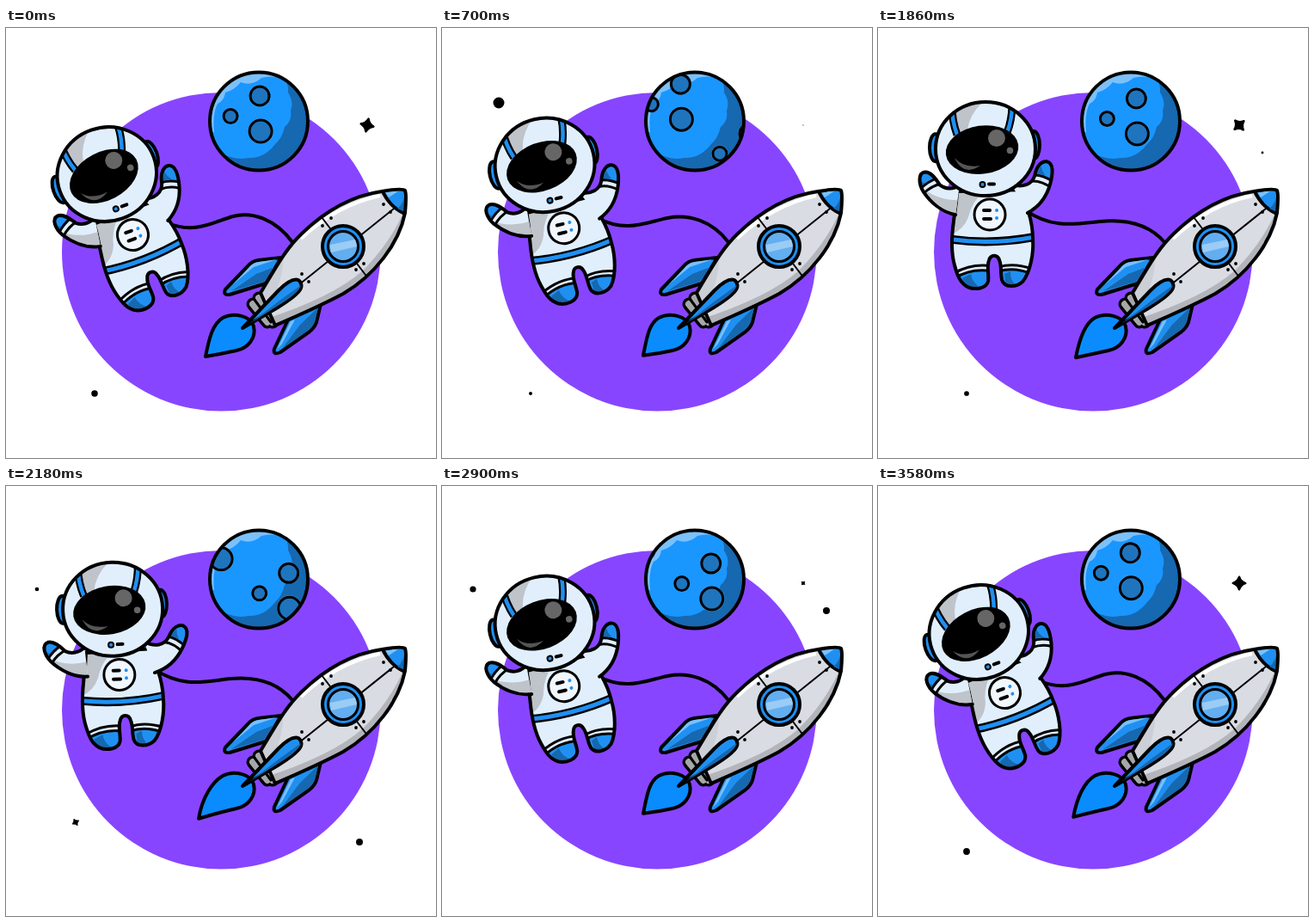
These frames come from a looping animation (500x500 px, 3600 ms). An HTML page:

```html
<!DOCTYPE html>
<html lang="en">
<head>
<meta charset="utf-8">
<title>Astronaut and rocket</title>
<style>
  html, body { margin: 0; width: 100%; height: 100%; overflow: hidden; background: #fff; }
  svg { display: block; width: 100%; height: 100%; }
  .ink { stroke: #000; stroke-width: 4; stroke-linejoin: round; stroke-linecap: round; }
  .thin { stroke-width: 3; }
  .hair { stroke-width: 2; }
  .line { fill: none; }
  .suit { fill: #e1effd; }
  .blue { fill: #1f90f2; }
  .deep { fill: #1668b0; }
  .grey { fill: #bfc3ca; }
  .pale { fill: #7cc0fa; }
</style>
</head>
<body>
<svg viewBox="0 0 500 500">
  <defs>
    <clipPath id="moonClip"><circle cx="294" cy="108.500" r="57"/></clipPath>
    <clipPath id="helmetClip"><ellipse cx="125" cy="140.500" rx="57" ry="54"/></clipPath>
    <path id="torso" d="M92 190C91 208 89 214 88 224C85 245 85 262 89 276C92 287 95 296 104 301C113 305 126 303 128 294C129 286 126 277 129 270C131 263 139 263 141 270C144 277 142 285 144 293C147 302 160 302 168 295C177 284 181 262 180 246C180 232 178 224 175 214L172 188Z"/>
    <clipPath id="torsoClip"><use href="#torso"/></clipPath>
    <path id="hull" d="M437 190Q461 186 464 189Q466 194 464 215C457 251 428 288 392 309C366 323 340 334 313 346L296 308C312 282 324 258 344 239C372 212 402 195 437 190Z"/>
    <clipPath id="hullClip"><use href="#hull"/></clipPath>
    <path id="armL" d="M95 183C87 188 78 187 72 182C67 174 62 167 55 167C47 168 47 180 53 190C61 202 74 214 90 217"/>
    <clipPath id="armLClip"><use href="#armL"/></clipPath>
    <path id="armR" d="M155 182C168 186 179 182 182 171C184 160 190 154 196 155C204 157 203 169 200 181C196 196 187 208 174 215"/>
    <clipPath id="armRClip"><use href="#armR"/></clipPath>
  </defs>

  <circle cx="250.300" cy="260.300" r="185.300" fill="#8845ff"/>
  <g id="sparks"></g>

  <g clip-path="url(#moonClip)">
    <circle cx="294" cy="108.500" r="57" fill="#1a96ff"/>
    <path class="pale" d="M230 110L240 60L290 45L345 70Q318 52 297 58Q286 68 273 63Q266 72 255 75Q254 84 246 88Q240 98 242 122Z"/>
    <path class="deep" d="M322 52Q329 66 328 75Q335 86 331 96Q333 108 324 115Q321 128 313 135Q300 152 282 151Q262 155 246 142L270 172H360V60Z"/>
    <g id="craters"></g>
  </g>
  <circle class="ink line" cx="294" cy="108.500" r="57"/>

  <path id="rope" class="ink line"/>

  <g id="rocket">
    <path id="flame" class="ink" fill="#0a8cff"/>
    <path class="ink blue" d="M320 267L293 270Q286 271 281 277L255 304Q252 311 260 310L302 297Z"/>
    <path class="deep" d="M262 306L291 286L312 278L300 295Z"/>
    <path class="pale" d="M315 269L294 272Q287 273 283 278L264 298L288 278Z"/>
    <path class="ink blue" d="M366 321L361 342Q359 348 353 353L319 377Q310 381 312 373L329 337Z"/>
    <path class="deep" d="M363 325L359 341Q357 347 351 352L321 373L342 345Z"/>
    <path class="pale" d="M315 374L331 341L336 339L321 367Z"/>
    <path class="line" d="M287 321L304 342M294 314L310 342" stroke="#000" stroke-width="15" stroke-linecap="round"/>
    <path class="line" d="M287 321L304 342M294 314L310 342" stroke="#a5a7a8" stroke-width="8" stroke-linecap="round"/>
    <path class="ink line thin" d="M289 316L308 342"/>
    <use href="#hull" fill="#d9dce3"/>
    <g clip-path="url(#hullClip)">
      <path fill="#b3b5bb" d="M470 195Q453 244 415 282Q380 313 300 339V360H430L480 260Z"/>
      <path class="grey" d="M290 310L322 262Q324 285 310 318Z" opacity=".5"/>
      <path class="line" stroke="#fff" stroke-width="4" d="M343 245Q384 206 435 195"/>
      <path class="ink line hair" d="M364 216L421 291M330 307L456 206"/>
      <path class="ink blue" d="M437 188Q446 209 466 217L475 180Z"/>
      <path class="deep" d="M464 190Q463 204 455 210L466 215Z"/>
      <path class="pale" d="M441 191L459 188L445 197Z"/>
    </g>
    <use href="#hull" class="ink line"/>
    <g id="rivets"></g>
    <circle class="ink blue" cx="392" cy="254" r="24"/>
    <circle class="ink thin" cx="392" cy="254" r="17.500" fill="#63aef0"/>
    <path fill="#9accf5" d="M377 252L406 246L408 254L378 261Z"/>
    <path class="ink blue" d="M275 349L317 305Q332 290 340 293Q347 299 340 307Q334 314 316 325Z"/>
    <path class="deep" d="M283 344L318 317L343 299Q341 308 316 323Z"/>
  </g>

  <g id="astronaut">
    <use href="#torso" class="suit"/>
    <g clip-path="url(#torsoClip)">
      <path class="grey" d="M80 188H124Q108 204 105 220Q99 236 82 241Z"/>
      <path class="line" stroke="#000" stroke-width="10" d="M80 245Q133 253 187 242"/>
      <path class="line" stroke="#1f90f2" stroke-width="5" d="M80 245Q133 253 187 242"/>
      <path class="ink blue thin" d="M88 291Q110 278 133 283V310H88ZM140 283Q158 277 182 287V310H140Z"/>
      <path class="ink line thin" d="M88 285Q110 273 133 277M140 278Q158 272 182 281"/>
      <path class="deep" d="M98 291L108 286Q109 296 120 303H100ZM147 286L154 283Q153 293 161 300H148Z"/>
    </g>
    <use href="#torso" class="ink line"/>
    <g id="leftArm">
      <use href="#armL" class="suit"/>
      <g clip-path="url(#armLClip)">
        <path class="grey" d="M50 184Q70 202 100 200V222H70Z"/>
        <path class="ink blue thin" d="M50 186Q58 178 70 174L60 160L40 165Z"/>
        <path class="ink line thin" d="M53 192Q62 183 76 180"/>
        <path class="deep" d="M50 172Q50 180 55 180L50 184Z"/>
      </g>
      <use href="#armL" class="ink line"/>
    </g>
    <g id="rightArm">
      <use href="#armR" class="suit"/>
      <g clip-path="url(#armRClip)">
        <path class="ink blue thin" d="M180 171Q191 170 204 179L210 150H180Z"/>
        <path class="ink line thin" d="M178 178Q190 177 202 186"/>
        <path class="deep" d="M184 169L189 160Q190 166 194 171Z"/>
      </g>
      <use href="#armR" class="ink line"/>
    </g>
    <circle class="ink thin" cx="130" cy="217" r="18" fill="#f1f7fe"/>
    <path class="ink line" d="M123 212H130M123 222H131"/>
    <path class="blue" d="M136 212a2 2 0 1 0 4 0a2 2 0 1 0-4 0M136 221a2 2 0 1 0 4 0a2 2 0 1 0-4 0"/>

    <ellipse class="ink blue" cx="67" cy="139" rx="7" ry="16"/>
    <ellipse class="ink blue" cx="181" cy="136" rx="7" ry="16"/>
    <ellipse class="suit" cx="125" cy="140.500" rx="58" ry="54.500"/>
    <g clip-path="url(#helmetClip)">
      <path class="grey" d="M87 84L92 124L104 119Q106 100 124 84Z"/>
      <path class="line" stroke="#000" stroke-width="9" d="M86 90Q86 108 92 124M156 90Q156 106 150 122"/>
      <path class="line" stroke="#1f90f2" stroke-width="4.500" d="M86 90Q86 108 92 124M156 90Q156 106 150 122"/>
    </g>
    <ellipse class="ink line" cx="125" cy="140.500" rx="58" ry="54.500"/>
    <ellipse cx="121" cy="141.500" rx="42.500" ry="28" transform="rotate(-8 121 141)"/>
    <circle cx="138" cy="128" r="10" fill="#666"/>
    <circle cx="153.500" cy="142.500" r="3.800" fill="#666"/>
    <path fill="#555" d="M89 151Q99 163 119 160Q99 173 89 151Z"/>
    <circle class="ink blue hair" cx="121.500" cy="182" r="3"/>
    <path class="ink line" d="M129 181.500H135"/>
  </g>
</svg>
<script>
const LOOP = 3600, BEAT = 900;
const $ = id => document.getElementById(id);
const mix = (a, b, k) => a + (b - a) * k;

function add(parent, tag, attrs) {
  const node = document.createElementNS("http://www.w3.org/2000/svg", tag);
  for (const name in attrs) node.setAttribute(name, attrs[name]);
  return $(parent).appendChild(node);
}

const starShape = {
  d: "M0-1Q.2-.3 1 0Q.3.2 0 1Q-.2.3-1 0Q-.3-.2 0-1Z",
  stroke: "#000", "stroke-width": .35, "stroke-linejoin": "round"
};

// x, y, radius, time of largest size, half duration, four-pointed
const sparks = [
  [420, 113, 7.5, 20, 230, true], [81, 391, 4, 410, 180, true],
  [447, 145, 4, 200, 180], [66, 87, 6.5, 690, 180], [36, 120, 4, 260, 200],
  [103, 425, 4, 850, 225], [411, 414, 4, 390, 180]
].map(([x, y, size, peak, span, star]) => ({
  x, y, size, peak, span, star,
  node: star ? add("sparks", "path", starShape) : add("sparks", "circle", { r: 1 })
}));

// Two sets of craters, one step apart, scroll across the moon
const step = { x: 79.6, y: 57.5 };
for (const [x, y, r] of [[295, 79, 11], [261, 102.5, 8], [296, 120, 13]])
  for (const k of [-1, 0]) {
    const cx = x + k * step.x, cy = y + k * step.y;
    add("craters", "circle", { cx, cy, r: r + 2, fill: "#55b0fc", opacity: .5 });
    add("craters", "circle", { cx, cy, r, fill: "#1f74be", class: "ink thin" });
  }

for (const [x, y] of [[368, 230], [378, 221], [439, 205], [447, 214], [407, 281], [416, 274], [344, 286], [352, 295]])
  add("rivets", "circle", { cx: x, cy: y, r: 1.9 });

// Reach of the flame tip over half a beat
const flicker = [[0, 232], [60, 230], [200, 234], [250, 234], [380, 224], [430, 227], [450, 232]];
function flameTip(t) {
  const i = flicker.findIndex(([end]) => end > t);
  const [t0, x0] = flicker[i - 1], [t1, x1] = flicker[i];
  return mix(x0, x1, (t - t0) / (t1 - t0));
}

function draw(t) {
  const beat = t % BEAT, turn = beat / BEAT;
  const lift = (1 - Math.cos(2 * Math.PI * t / LOOP)) / 2;
  const wave = Math.sin(Math.PI * turn) ** 2;
  const set = (id, value) => $(id).setAttribute("transform", value);

  set("astronaut", `translate(${mix(147.5, 130, lift)} ${mix(240.5, 217, lift)}) rotate(${-19.5 * (1 - lift)}) translate(-130 -217)`);
  set("leftArm", `rotate(${-13 * wave} 95 203)`);
  set("rightArm", `rotate(${14 * wave} 168 203)`);
  set("craters", `translate(${step.x * turn} ${step.y * turn ** 1.1})`);

  const at = (a, b) => mix(a, b, lift).toFixed(2);
  $("rope").setAttribute("d", `M${at(186, 170)} ${at(226, 211)}C${at(220, 203)} ${at(241, 234)} ${at(242, 228)} ${at(225, 228)} ${at(264, 258)} ${at(219, 225)}S${at(313, 315)} ${at(222, 228)} 333 249`);

  const x = flameTip(t % 450), y = 382 - (x - 232) * .6;
  $("flame").setAttribute("d", `M${x} ${y}C${x + 4} 362 240 344 252 337C265 330 285 335 288 347C291 360 282 372 268 375Q250 379 ${x} ${y}Z`);

  for (const s of sparks) {
    const away = Math.abs((beat - s.peak + 1.5 * BEAT) % BEAT - BEAT / 2);
    const size = away < s.span ? s.size * Math.cos(Math.PI / 2 * away / s.span) : 0;
    const spin = s.star ? .6 * (beat + 20) : 0;
    s.node.setAttribute("transform", `translate(${s.x} ${s.y}) rotate(${spin}) scale(${size})`);
  }
}

function tick() {
  draw(performance.now() % LOOP);
  requestAnimationFrame(tick);
}
tick();
</script>
</body>
</html>
```
